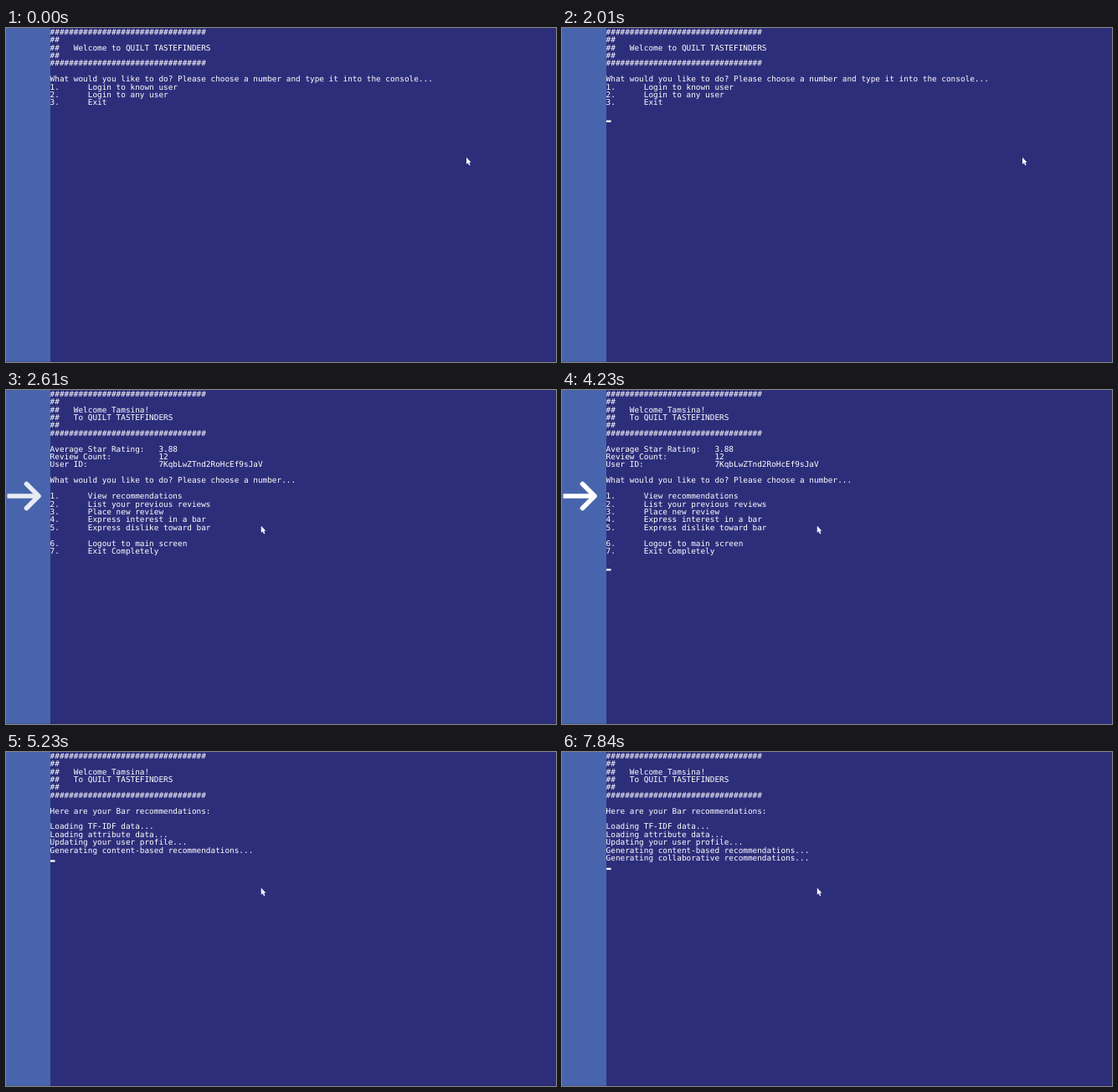
These frames come from a looping animation (657x400 px, 8 s). An HTML page:

```html
<!DOCTYPE html>
<html lang="en">
<head>
<meta charset="utf-8">
<title>Console menu</title>
<style>
  html, body { margin: 0; width: 100%; height: 100%; overflow: hidden; background: #2d2e7a; }
  svg { display: block; width: 657px; height: 400px; }
  text {
    font: 9.39px "DejaVu Sans Mono", monospace;
    fill: #fff;
    white-space: pre;
    text-rendering: geometricPrecision;
  }
</style>
</head>
<body>
<svg viewBox="0 0 657 400">
  <clipPath id="panel"><rect x="52.6" width="605" height="400"/></clipPath>
  <rect width="657" height="400" fill="#2d2e7a"/>
  <rect width="53" height="400" fill="#4864ac"/>
  <rect y="399" width="657" height="1" fill="#000" opacity=".12"/>
  <g id="screen" clip-path="url(#panel)"></g>
  <rect id="caret" x="53" width="5.5" height="2.3" fill="#fff"/>
  <g id="arrow" fill="none" stroke="#fff" stroke-width="5.6">
    <path d="M1.5 127H38"/>
    <path d="M24.5 112.5L39 127L24.5 141.5" stroke-linecap="round" stroke-linejoin="round"/>
  </g>
  <path id="mouse" fill="#fff" d="M0 0V8.2L1.9 6.5L3.2 9.6L4.6 9L3.3 6H5.6Z"/>
</svg>
<script>
const LOOP = 8000, ROW = 9.42, LEFT = 52.6, BASE = 7.7;
const $ = id => document.getElementById(id);
const bar = '#'.repeat(33);
const item = (n, label) => `${n}.`.padEnd(8) + label;
const field = (name, value) => `${name}:`.padEnd(23) + value;

const login = [
  bar, '##', '##   Welcome to QUILT TASTEFINDERS', '##', bar, '',
  'What would you like to do? Please choose a number and type it into the console...',
  item(1, 'Login to known user'),
  item(2, 'Login to any user'),
  item(3, 'Exit')
];
const header = [bar, '##', '##   Welcome Tamsina!', '##   To QUILT TASTEFINDERS', '##', bar, ''];
const menu = [
  ...header,
  field('Average Star Rating', '3.88'),
  field('Review Count', '12'),
  field('User ID', '7KqbLwZTnd2RoHcEf9sJaV'), '',
  'What would you like to do? Please choose a number...', '',
  item(1, 'View recommendations'),
  item(2, 'List your previous reviews'),
  item(3, 'Place new review'),
  item(4, 'Express interest in a bar'),
  item(5, 'Express dislike toward bar'), '',
  item(6, 'Logout to main screen'),
  item(7, 'Exit Completely')
];
const results = [
  ...header, 'Here are your Bar recommendations:', '',
  'Loading TF-IDF data...',
  'Loading attribute data...',
  'Updating your user profile...',
  'Generating content-based recommendations...',
  'Generating collaborative recommendations...'
];

// Each track lists [start time, value]; a value holds until the next one.
const screens = [
  [0, login], [2210, menu],
  ...[4430, 4630, 4830, 5030, 6030].map((t, i) => [t, results.slice(0, 10 + i)])
];
const caretRow = [
  [0, 0], [400, 11], [800, 0], [1200, 11], [1610, 0], [2010, 11],
  [2210, 22], [2610, 0], [3230, 22], [3630, 0], [4230, 22], [4430, 0],
  [5230, 13], [5430, 0], [5830, 13], [6030, 14], [7240, 0], [7840, 14]
];
const arrowAlpha = [
  [0, 0], [2210, .2], [2410, .55], [2610, .87], [2830, 1],
  [4430, .7], [4630, .35], [4830, 0]
];
const mousePos = [[0, [550, 155]], [2210, [304.8, 162.8]]];

const at = (track, t) => track.findLast(step => step[0] <= t)[1];

let shown;
function print(lines) {
  if (lines === shown) return;
  shown = lines;
  $('screen').replaceChildren(...lines.map((line, i) => {
    const el = document.createElementNS('http://www.w3.org/2000/svg', 'text');
    el.setAttribute('x', LEFT);
    el.setAttribute('y', BASE + i * ROW);
    el.textContent = line;
    return el;
  }));
}

function draw(t) {
  print(at(screens, t));
  const row = at(caretRow, t);
  $('caret').setAttribute('visibility', row ? 'visible' : 'hidden');
  $('caret').setAttribute('y', 6.9 + row * ROW);
  $('arrow').setAttribute('opacity', at(arrowAlpha, t));
  $('mouse').setAttribute('transform', `translate(${at(mousePos, t)})`);
}

const start = performance.now();
function tick() {
  draw((performance.now() - start) % LOOP);
  requestAnimationFrame(tick);
}
tick();
</script>
</body>
</html>
```
